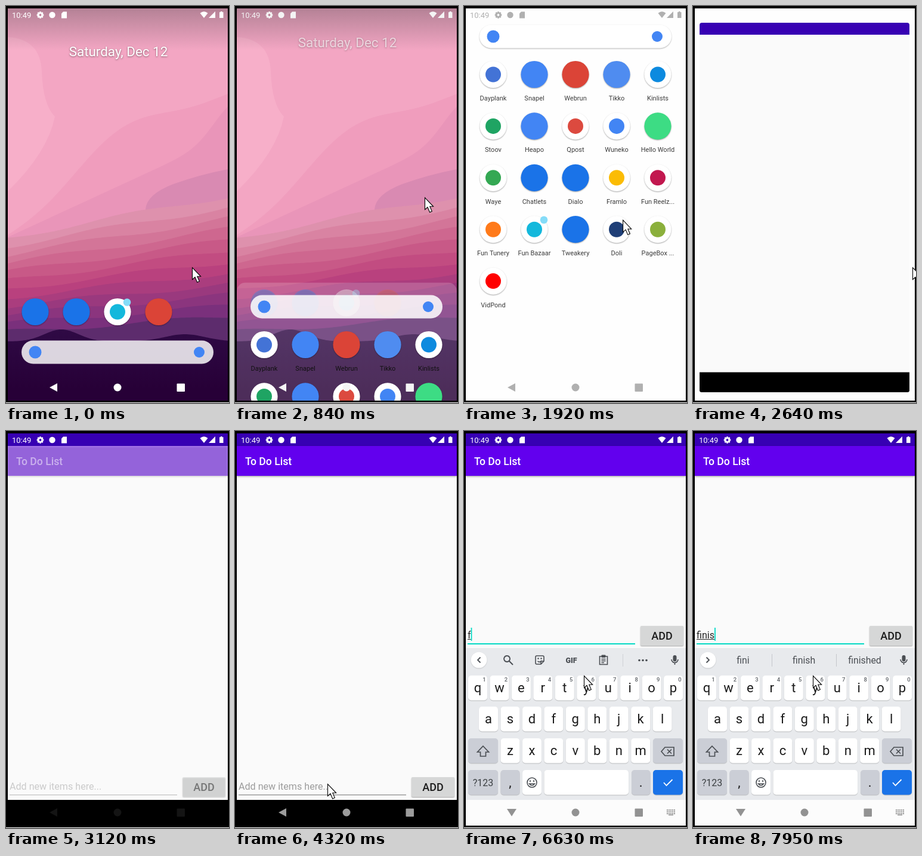
An HTML page with a canvas that plays this animation: 374 px wide and 664 px high, repeating every 8 s.

```html
<!DOCTYPE html>
<html lang="en">
<head>
<meta charset="utf-8">
<title>List app demo</title>
<style>
  html, body { margin: 0; width: 100%; height: 100%; overflow: hidden; background: #fff; }
  canvas { display: block; width: 374px; height: 664px; }
</style>
</head>
<body>
<canvas id="stage"></canvas>
<script>
const W = 374, H = 664, LOOP = 8000, STEP = 120;
const canvas = document.getElementById('stage');
const g = canvas.getContext('2d');
const ratio = window.devicePixelRatio || 1;
canvas.width = W * ratio;
canvas.height = H * ratio;

const BLUE = '#1a73e8', TEAL = '#03dac5', INK = '#4a4e53';

// label, disc colour, optional inner mark colour
const APPS = [
  ['Dayplank', '#fff', '#4373d6'], ['Snapel', '#4285f4'], ['Webrun', '#db4437'],
  ['Tikko', '#4f8cf0'], ['Kinlists', '#fff', '#0d8adf'],
  ['Stoov', '#fff', '#1fa463'], ['Heapo', '#4285f4'], ['Qpost', '#fff', '#dc4a3f'],
  ['Wuneko', '#fff', '#4285f4'], ['Hello World', '#3ddc84'],
  ['Waye', '#fff', '#34a853'], ['Chatlets', BLUE], ['Dialo', BLUE],
  ['Framlo', '#fff', '#fbbc04'], ['Fun Reelz...', '#fff', '#c2184f'],
  ['Fun Tunery', '#fff', '#ff7a1a'], ['Fun Bazaar', '#fff', '#14b8dc'], ['Tweakery', BLUE],
  ['Doli', '#fff', '#1f3f77'], ['PageBox ...', '#fff', '#8bb03c'],
  ['VidPond', '#fff', '#ff0000']
];
const DOCK = ['Dialo', 'Chatlets', 'Fun Bazaar', 'Webrun'];

// Stops of the pointer: time, x, y
const POINTER = [
  [0, 312, 437], [360, 324, 469], [480, 324, 469], [840, 318, 320], [1080, 347, 110],
  [1320, 315, 243], [2160, 254, 386], [2640, 368, 437], [3000, 392, 460],
  [3840, 155, 590], [4570, 155, 590], [5050, 185, 414], [5650, 201, 409]
];
const WORD = 'finis', KEY_TIMES = [6630, 7110, 7470, 7830, 7950];
const GUESSES = [['for', 'from'], ['first', 'fit'], ['fine', 'find'], ['finish', 'finished']];

const progress = (t, from, to) => Math.max(0, Math.min(1, (t - from) / (to - from)));
const ease = k => k * k * (3 - 2 * k);
const columnX = i => 49 + 69 * i;
const typedCount = t => KEY_TIMES.filter(k => t >= k).length;

function hold(t) {
  const snap = (from, last) => Math.min(last, from + Math.floor((t - from) / STEP) * STEP);
  if (t < 4570) return snap(0, 4320);
  if (t < 6140) return snap(4570, 5650);
  return t < 6630 ? 6140 : snap(6630, 7950);
}

function box(x, y, w, h, r, color) {
  g.fillStyle = color;
  g.beginPath();
  g.roundRect(x, y, w, h, r);
  g.fill();
}

function dot(x, y, r, color) {
  g.fillStyle = color;
  g.beginPath();
  g.arc(x, y, r, 0, 7);
  g.fill();
}

function text(s, x, y, size, color, align = 'left', weight = 400) {
  g.font = `${weight} ${size}px Roboto, sans-serif`;
  g.textAlign = align;
  g.fillStyle = color;
  g.fillText(s, x, y);
}

// Fills a path at (x, y), or strokes it when a width is given
function shape(d, x, y, color, width) {
  const p = new Path2D(d);
  g.save();
  g.translate(x, y);
  g.fillStyle = g.strokeStyle = color;
  g.lineWidth = width || 1;
  if (width) g.stroke(p); else g.fill(p);
  g.restore();
}

function group(alpha, draw) {
  if (alpha <= 0) return;
  g.save();
  g.globalAlpha *= alpha;
  draw();
  g.restore();
}

function shadow(blur, dy, color, draw) {
  g.save();
  g.shadowBlur = blur * ratio;
  g.shadowOffsetY = dy * ratio;
  g.shadowColor = color;
  draw();
  g.restore();
}

function gradient(y0, y1, from, to) {
  const fill = g.createLinearGradient(0, y0, 0, y1);
  fill.addColorStop(0, from);
  fill.addColorStop(1, to);
  return fill;
}

// Fills everything below the curve y = height(x)
function land(color, height) {
  g.beginPath();
  g.moveTo(3, 660);
  for (let x = 3; x <= 372; x += 3) g.lineTo(x, height(x));
  g.lineTo(372, 660);
  g.fillStyle = color;
  g.fill();
}

function wallpaper() {
  const bump = (x, mid, width) => Math.exp(-(((x - mid) / width) ** 2));
  box(3, 4, 369, 656, 0, '#f3a6c3');
  shape('M3 52Q58 55 60 110T82 185Q70 245 3 310Z', 0, 0, '#f7afc9');
  land('#f09dbd', x => 385 - 240 * Math.sin(x / 372 * 1.5) + 12 * Math.sin(x / 40));
  land('#e995b9', x => 388 - .46 * x - 52 * bump(x, 385, 50));
  shape('M3 425Q110 400 200 382Q236 365 234 340Q236 315 280 298Q325 282 372 273V450H3Z', 0, 0, '#d98ab2');

  const bands = 12;
  for (let i = 0; i < bands; i++) {
    const k = i / (bands - 1);
    land(`hsl(${338 - 53 * k ** 3}, ${54 - 11 * k}%, ${72 - 42 * k}%)`,
      x => 388 + 157 * k - (70 - 45 * k) * x / 372 + 4 * Math.sin(x / 45 + i));
  }
  land(gradient(540, 640, '#2f0a45', '#270037'),
    x => 561 - 20 * bump(x, 93, 40) - 12 * bump(x, 300, 48));
  box(3, 4, 369, 70, 0, gradient(4, 74, 'rgba(70,65,70,.36)', 'rgba(70,65,70,0)'));
}

function cog(x, y, color) {
  for (let i = 0; i < 8; i++) {
    g.save();
    g.translate(x, y);
    g.rotate(i * Math.PI / 4);
    box(-1.4, -5.8, 2.8, 3, .5, color);
    g.restore();
  }
  g.strokeStyle = color;
  g.lineWidth = 2.6;
  g.beginPath();
  g.arc(x, y, 3.2, 0, 7);
  g.stroke();
}

function statusIcons(color) {
  text('10:49', 10, 19.5, 13, color);
  cog(57.5, 15, color);
  dot(77.5, 15, 5.2, color);
  shape('M3 0H9V11H0V3Z', 93, 9.5, color);
  shape('M0 3Q6.5 -2.5 13 3L6.5 11Z', 325.5, 9, color);
  shape('M11 0V11H0Z', 340, 9, color);
  shape('M2 0H4.5V1.2H6.5V11H0V1.2H2Z', 358, 9, color);
}

function navIcons(color, typing) {
  shape(typing ? 'M-8 -6H8L0 6.5Z' : 'M-7 0L6 -7V7Z', 80, 638, color);
  dot(187, 638, 6.5, color);
  box(286.5, 631.5, 13.5, 13.5, 1, color);
  if (!typing) return;
  for (let i = 0; i < 15; i++) {
    box(340 + i % 5 * 3, 633 + Math.floor(i / 5) * 3, 2, 2, 0, color);
  }
  box(343, 641.5, 8, 1.5, 0, color);
}

function appIcon([label, disc, mark], x, y) {
  shadow(2, 1, 'rgba(0,0,0,.35)', () => dot(x, y, 22.6, disc));
  if (mark) dot(x, y, 13, mark);
  if (label === 'Fun Bazaar') dot(x + 16, y - 16, 6.3, '#85dcf8');
}

function searchBar(y, open) {
  const raised = open > .9 ? 1 : 0;
  shadow(2 * raised, raised, 'rgba(0,0,0,.3)', () =>
    box(26, y - 19.5, 322, 39, 19.5, `rgba(255,255,255,${.83 + .17 * open})`));
  dot(49, y, 10.5, '#4285f4');
  dot(324, y, 9, '#4285f4');
}

function launcher(t) {
  // A slow drag, then a fling to the top
  const off = 528 - 76 * progress(t, 600, 840) - 452 * ease(progress(t, 840, 1080));
  const open = 1 - off / 528;
  const lift = open * 104;
  if (open < 1) {
    wallpaper();
    group(1 - open * 2.4, () => shadow(3, 1, 'rgba(0,0,0,.45)', () =>
      text('Saturday, Dec 12', 188.5, 84 - lift, 22.4, '#fff', 'center')));
    group(1 - open * 4.2, () => DOCK.forEach((name, i) =>
      appIcon(APPS.find(app => app[0] === name), columnX(i), 511.5 - lift)));
  }
  group(Math.pow(open, .9), () => box(3, off * 1.024, 369, 700, off ? 14 : 0, '#fefefe'));
  group(1 - progress(t, 2160, 2520), () => {
    group(progress(open, 0, .12), () => APPS.forEach((app, i) => {
      const x = columnX(i % 5), y = 114.5 + Math.floor(i / 5) * 86.4 + off;
      appIcon(app, x, y);
      text(app[0], x, y + 43.5, 11, off ? '#111' : '#3c3c3c', 'center');
    }));
    searchBar(51 + off, open);
    const v = 255 - 79 * open;
    statusIcons(`rgb(${v},${v},${v})`);
    navIcons(`rgb(${v},${v},${v})`);
  });
}

function emptyWindow() {
  box(3, 4, 369, 656, 0, '#fafafa');
  box(3, 4, 369, 21, 0, '#3700b3');
  box(3, 617, 369, 43, 0, '#000');
}

// The window grows out of the tapped icon, a little faster in width
function openingWindow(t) {
  const left = 1 - progress(t, 2280, 2760);
  const wide = left ** 2.1, tall = left ** 1.93;
  const x = 3 + 147 * wide, y = 4 + 347 * tall;
  const w = 369 - 312 * wide, h = 656 - 550 * tall, scale = w / 369;
  g.save();
  g.beginPath();
  g.roundRect(x, y, w, h, 4);
  g.clip();
  g.translate(x, y);
  g.scale(scale, scale);
  g.translate(-3, -4);
  emptyWindow();
  box(3, Math.min(617, h / scale - 31), 369, 60, 0, '#000');
  g.restore();
}

function entryRow(t) {
  const focused = t >= 4570;
  const typed = WORD.slice(0, typedCount(t));
  text(typed || 'Add new items here...', 6, 600, 16.1, typed ? '#222' : '#9c9c9c');
  const width = typed ? g.measureText(typed).width : 0;
  box(6, 601, width, 1, 0, '#222');
  box(6, 608, 281, focused ? 2 : 1.2, 0, focused ? TEAL : '#8c8c8c');
  const blinkOff = t >= 5650 && t < 6140;
  if (focused && !blinkOff) box(6 + width, 582, 1.8, 22, 0, TEAL);
  shadow(2, 1, 'rgba(0,0,0,.35)', () => box(296, 579, 72, 33, 2, '#d6d7d7'));
  text('ADD', 332, 602, 18, '#1c1c1c', 'center', 500);
}

function key(x, y, w, label, color = '#fff') {
  shadow(1, 1, 'rgba(0,0,0,.2)', () => box(x, y, w, 41.5, 5, color));
  if (label) text(label, x + w / 2, y + 28, 22, '#1b1b1b', 'center');
}

function toolStrip() {
  shape('M2.5 -4.5L-2 0L2.5 4.5', 25, 383, INK, 1.8);
  shape('M-2 -7A5 5 0 1 0 -1.9 -7M2 2L8 8', 74, 383, INK, 1.9);
  shape('M-7 -5Q-7 -7 -5 -7H5Q7 -7 7 -5V2L2 7H-5Q-7 7 -7 5ZM-3.5 2Q0 5 3.5 1M7 2H2V7', 127, 383, INK, 1.6);
  dot(124.5, 380.5, 1.2, INK);
  dot(129.5, 380.5, 1.2, INK);
  text('GIF', 180, 387.5, 12.5, INK, 'center', 900);
  shape('M-6.5 -6H6.5V7.5H-6.5ZM-3.5 -1.5H3.5M-3.5 1.5H3.5M-3.5 4.5H1', 234, 383, INK, 1.6);
  box(230.5, 374.5, 7, 4.5, 1, INK);
  box(266, 373, 1, 21, 0, '#cfd1d6');
  for (let i = 0; i < 3; i++) dot(294 + 6 * i, 383.5, 1.8, INK);
}

// Suggestions lag one step behind the typing
function wordStrip(t) {
  const n = typedCount(t - STEP);
  if (!n) return;
  shape('M-2.5 -4.5L2 0L-2.5 4.5', 25, 383, INK, 1.8);
  [WORD.slice(0, n), ...GUESSES[n - 1]].forEach((word, i) => {
    text(word, 84 + i * 102, 389, 15.8, INK, 'center');
    if (i) box(24 + i * 108, 373, 1, 21, 0, '#c4c6cb');
  });
}

function keyboard(t) {
  const pitch = 36.45, gray = '#cbced6';
  box(3, 363, 369, 254, 0, '#e8eaed');
  shadow(2, 1, 'rgba(0,0,0,.15)', () => dot(25, 383, 13.3, '#fff'));
  const swap = progress(t, 6630, 6870);
  group(1 - swap, toolStrip);
  group(swap, () => wordStrip(t));
  box(350.5, 375, 6, 10.5, 3, INK);
  shape('M-5.5 -1A5.5 5.5 0 0 0 5.5 -1M0 4.5V8', 353.5, 383, INK, 1.6);

  const letters = (row, x, y) => [...row].forEach((c, i) => key(x + i * pitch, y, 32, c));
  letters('qwertyuiop', 7, 409);
  letters('asdfghjkl', 25, 461);
  letters('zxcvbnm', 61.5, 514);
  for (let i = 0; i < 10; i++) {
    text((i + 1) % 10, 34 + i * pitch, 419, 9.5, '#5f6368', 'center', 500);
  }
  key(7, 514, 50, '', gray);
  shape('M0 -9L9.5 1H4.5V8H-4.5V1H-9.5Z', 32, 536, INK, 1.7);
  key(317, 514, 50, '', gray);
  shape('M-11 0L-5 -7H10V7H-5ZM-1 -3.5L6 3.5M6 -3.5L-1 3.5', 342, 536, INK, 1.7);

  key(7, 567, 50, '', gray);
  text('?123', 32, 594, 16, '#3c4043', 'center');
  key(61.5, 567, 32, ',', gray);
  key(98, 567, 32);
  shape('M8 0A8 8 0 1 1 -8 0A8 8 0 1 1 8 0M-4.5 2Q0 7.5 4.5 2Z', 114, 588, INK, 1.6);
  dot(111, 585.5, 1.3, INK);
  dot(117, 585.5, 1.3, INK);
  key(134.5, 567, 141.5);
  key(281, 567, 31.5, '.', gray);
  key(317, 567, 50, '', BLUE);
  shape('M-7 0L-2.5 5L7.5 -5', 342, 588, '#fff', 1.8);
}

function shifted(dy, draw) {
  g.save();
  g.translate(0, dy);
  draw();
  g.restore();
}

function listApp(t) {
  const typing = t >= 4690;
  emptyWindow();
  statusIcons('#fff');
  group(progress(t, 3000, 3240), () => {
    shadow(3, 1, 'rgba(0,0,0,.4)', () => box(3, 25, 369, 50, 0, '#6200ee'));
    text('To Do List', 17, 57, 17.6, '#fff', 'left', 500);
    shifted(typing ? -253 : 0, () => entryRow(t));
  });
  if (typing) {
    shifted(297 * (1 - progress(t, 4570, 4930)) ** 2, () => keyboard(t));
    box(3, 617, 369, 43, 0, '#fcfcfc');
    navIcons('#929292', true);
  } else {
    group(progress(t, 3000, 3960), () => navIcons('#9c9c9c'));
  }
}

function pointer(t) {
  const next = POINTER.findIndex(stop => stop[0] > t);
  const b = POINTER.at(next), a = next > 0 ? POINTER[next - 1] : b;
  const k = a === b ? 0 : ease(progress(t, a[0], b[0]));
  const x = a[1] + (b[1] - a[1]) * k, y = a[2] + (b[2] - a[2]) * k;
  const d = 'M.5 .5V20.5L5 16.5L8.6 25L12.3 23.4L8.8 15.3H14.6Z';
  shape(d, x, y, '#fff');
  shape(d, x, y, '#000', 1.1);
}

function draw(t) {
  g.setTransform(ratio, 0, 0, ratio, 0, 0);
  box(0, 0, W, H, 0, '#fff');
  box(0, 0, W, 663, 0, '#000');
  g.save();
  g.beginPath();
  g.rect(3, 4, 369, 656);
  g.clip();
  if (t < 2760) launcher(t);
  if (t >= 2400 && t < 2760) openingWindow(t);
  if (t >= 2760) listApp(t);
  g.restore();
  pointer(t);
}

const start = performance.now();
function tick() {
  draw(hold((performance.now() - start) % LOOP));
  requestAnimationFrame(tick);
}
tick();
</script>
</body>
</html>
```
